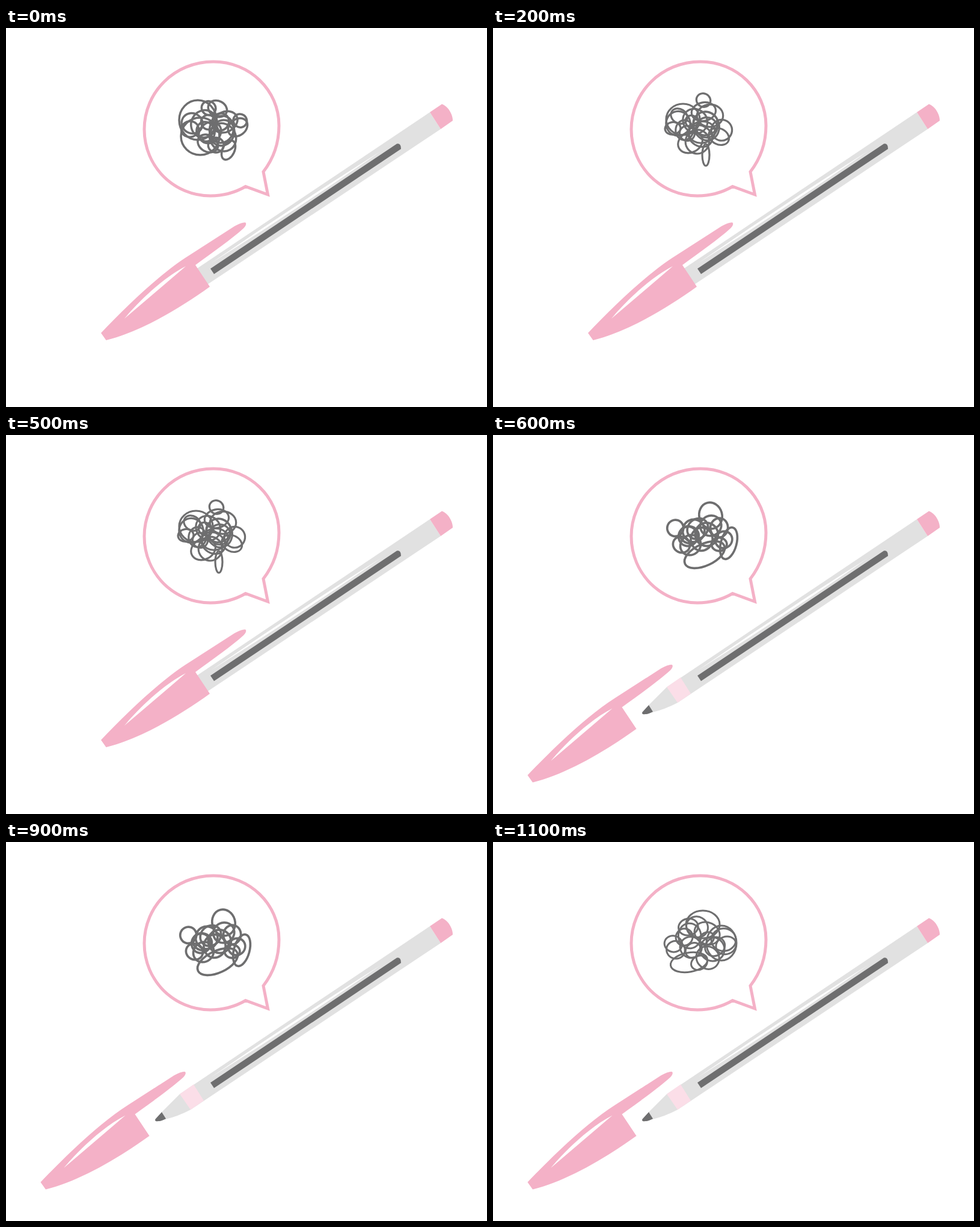
An HTML page for the animation above (1.2 s loop, 800x630 px).

```html
<!DOCTYPE html>
<html lang="en">
<head>
<meta charset="utf-8">
<title>Pen with tangled thoughts</title>
<style>
  html, body { margin: 0; width: 100%; height: 100%; overflow: hidden; background: #fff; }
  svg { display: block; width: 100vw; height: 100vh; }
  .pink { fill: #f4b1c7; }
  .grey { fill: #e1e1e1; }
  .ink { fill: #6e6e6f; }
  .white { fill: #fff; }
  #scribbles { fill: none; stroke: #6e6e6f; }
</style>
</head>
<body>
<svg viewBox="0 0 800 630">
  <path fill="none" stroke="#f4b1c7" stroke-width="5"
    d="M428 239C445 217 454 190 454 162C454 103 405 56 345 56C280 56 230 107 230 168.5C230 231 280 279 340 279C362 279 382 273 398.5 263.5L435.5 277Z"/>
  <g id="scribbles"></g>
  <g id="pen">
    <path class="grey" d="M289 419L705 140L723 168L307 445Q286 456 265 461L258 450Z"/>
    <path fill="#fbdee8" d="M289 419L312 403L329 430L307 445Z"/>
    <path class="ink" d="M259 449L266 460C260 463.5 253 465 249 464Q247 462 249 460Z"/>
    <path class="white" d="M341 391Q480 295 623 205Q483 302 341 391Z"/>
    <path class="ink" d="M340 400L650 192.5Q657 191 657 201L346 409Z"/>
    <path class="pink" d="M705 140L725 126.5C735 130 743 143 743 154L723 168Z"/>
  </g>
  <g id="cap">
    <path class="pink" d="M158 507C200 463 257 408 303 379L380 329.5Q394 322 398.5 323.5Q401 327 395 333C375 351 345 372 315 394L339 430C285 469 220 506 166.5 519Z"/>
    <path class="white" d="M197 483C213 463 256 418 299 396Z"/>
  </g>
</svg>
<script>
const STEP = 100;
const STEPS = 12;
const OPEN_AT = 6;
const TAU = Math.PI * 2;
const GOLDEN_ANGLE = Math.PI * (3 - Math.sqrt(5));

// A tangle is a seeded cluster of loops plus a few strays that shape its outline.
// Strays: centre x, centre y, radius x, radius y, tilt.
const tangles = {
  knot: {
    seed: 3, width: 3.5, count: 17, center: [347, 164], reach: [56, 43],
    strays: [[319, 153, 31, 33, 0], [323, 180, 32, 31, 0], [370, 203, 10, 17, 25]]
  },
  curls: {
    seed: 8, width: 3.2, count: 18, center: [342, 166], reach: [56, 43],
    strays: [[354, 211, 6, 18, 0], [350, 120, 12, 11, 30], [316, 152, 28, 26, 0]]
  },
  petals: {
    seed: 14, width: 2.7, count: 19, center: [345, 168], reach: [50, 47],
    strays: [[303, 139, 27, 12, 25], [327, 202, 33, 25, -10]]
  },
  swirl: {
    seed: 21, width: 3.7, count: 13, center: [342, 166], reach: [60, 34],
    strays: [[352, 199, 36, 18, -25], [392, 180, 13, 27, 15], [362, 134, 19, 22, -15]]
  },
  cloud: {
    seed: 27, width: 3, count: 16, center: [345, 168], reach: [60, 44],
    strays: [[326, 200, 31, 16, -10], [349, 137, 28, 23, 0], [380, 168, 25, 29, 0]]
  }
};
const closedCycle = ["knot", "petals", "curls"];
const openCycle = ["swirl", "petals", "cloud"];

const layer = document.getElementById("scribbles");
const cap = document.getElementById("cap");

function seededRandom(seed) {
  let state = seed * 7919;
  return () => (state = (state * 16807) % 2147483647) / 2147483647;
}

function ellipse([x, y, rx, ry, tilt]) {
  return `<ellipse cx="${x}" cy="${y}" rx="${rx}" ry="${ry}" transform="rotate(${tilt} ${x} ${y})"/>`;
}

// Alternates loops touching the rim with loops nearer the middle.
function clusterLoops({ seed, count, center, reach }) {
  const random = seededRandom(seed);
  const phase = random() * TAU;
  return Array.from({ length: count }, (_, i) => {
    const angle = phase + i * GOLDEN_ANGLE;
    const rx = 11 + random() * 11;
    const ry = rx * (0.75 + random() * 0.4);
    const spread = i % 2 ? 0.3 + random() * 0.4 : 1;
    return [
      center[0] + Math.cos(angle) * (reach[0] - rx) * spread,
      center[1] + Math.sin(angle) * (reach[1] - ry) * spread,
      rx, ry, random() * 90 - 45
    ];
  });
}

for (const [name, tangle] of Object.entries(tangles)) {
  const shapes = [...clusterLoops(tangle), ...tangle.strays].map(ellipse).join("");
  layer.insertAdjacentHTML("beforeend", `<g id="${name}" stroke-width="${tangle.width}">${shapes}</g>`);
}

function draw(time) {
  const step = Math.floor(time / STEP) % STEPS;
  const open = step >= OPEN_AT;
  const visible = (open ? openCycle : closedCycle)[step % 3];
  for (const group of layer.children) {
    group.style.display = group.id === visible ? "" : "none";
  }
  cap.setAttribute("transform", open ? "translate(-100.5 58.5)" : "");
}

const start = performance.now();
function tick() {
  draw(performance.now() - start);
  requestAnimationFrame(tick);
}
tick();
</script>
</body>
</html>
```
